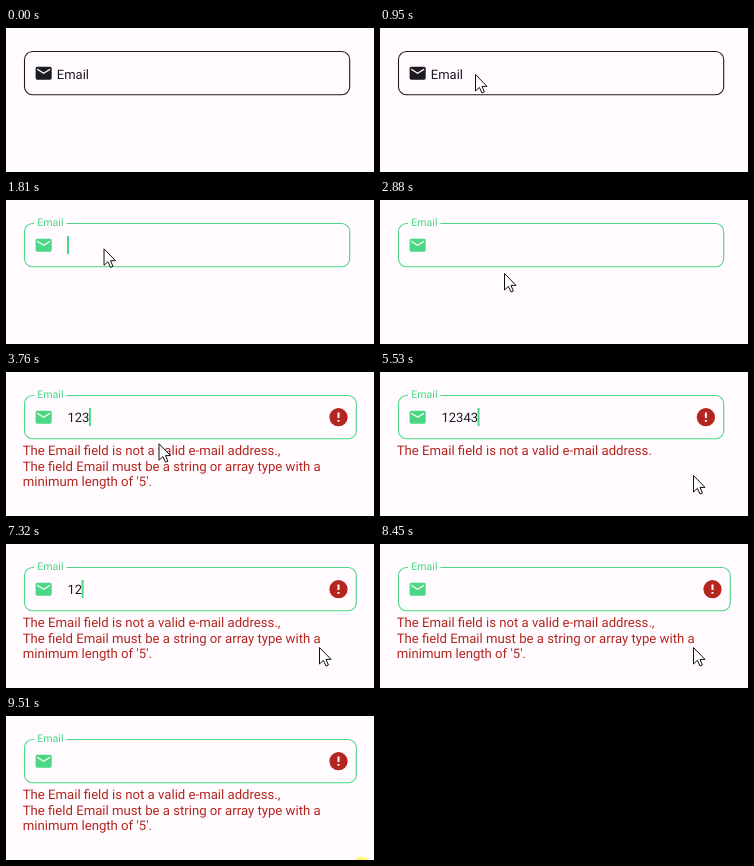
Animation of 368 by 144 pixels, one loop 9.65 s. Source, as an HTML page:

```html
<!DOCTYPE html>
<html lang="en">
<head>
<meta charset="utf-8">
<style>
  html, body { margin: 0; width: 100%; height: 100%; overflow: hidden; background: #fffbff; }
  svg { display: block; width: 368px; height: 144px; font-family: Roboto, sans-serif; text-rendering: geometricPrecision; }
</style>
</head>
<body>
<svg viewBox="0 0 368 144">
  <path id="outline" fill="none"/>
  <path id="mail" transform="translate(28 35.6) scale(.805)"
    d="M20 4H4c-1.1 0-2 .9-2 2v12c0 1.1.9 2 2 2h16c1.1 0 2-.9 2-2V6c0-1.1-.9-2-2-2zm0 4l-8 5-8-5V6l8 5 8-5z"/>
  <text id="label">Email</text>
  <text id="value" x="61.5" y="50" font-size="13" fill="#1c1b1f"></text>
  <rect id="caret" y="36" width="2" height="18" fill="#4bd783"/>
  <g id="badge">
    <circle r="9.1" fill="#b3261e"/>
    <path d="M-1-4.8H1V.9H-1ZM-1 2.7H1V4.6H-1Z" fill="#fffbff"/>
  </g>
  <g id="errors" font-size="13.17" fill="#b3261e">
    <text id="first" x="16.7" y="83"></text>
    <g id="rest">
      <text x="16.7" y="98.7">The field Email must be a string or array type with a</text>
      <text x="16.7" y="114.4">minimum length of '5'.</text>
    </g>
  </g>
  <circle id="press" r="9" fill="#fff25a" fill-opacity=".85"/>
  <path id="pointer" d="M.5.5V17L4.4 13.4L7 19L9.4 18L7 12.4H12Z" fill="#fff" stroke="#111" stroke-linejoin="round"/>
</svg>
<script>
const LOOP = 9650;
const GREEN = '#4bd783', INK = '#1c1b1f';
const FOCUS = 1280;
const BLINK = 500;
const DIGIT = 7.3;
const $ = id => document.getElementById(id);

// [time, field text]
const edits = [
  [1375, ''], [3145, '1'], [3415, '12'], [3615, '123'], [4095, '1234'], [4525, '12343'],
  [6260, '1234'], [7045, '123'], [7245, '12'], [7645, '1'], [7920, '']
];

// [start, end, from, control, to]
const moves = [
  [70, 945, [300, 146], [262, 66], [95, 46]],
  [1745, 2090, [95, 46], [108, 58], [124, 73]],
  [3620, 3860, [124, 73], [146, 70], [170, 72]],
  [4050, 4860, [170, 72], [240, 74], [306, 97]],
  [5120, 5330, [306, 97], [310, 100], [313, 103]],
  [9060, 9330, [313, 103], [330, 122], [348, 150]]
];

const clamp = x => Math.max(0, Math.min(1, x));
const mix = (a, b, k) => a + (b - a) * k;
const ease = k => k * k * (3 - 2 * k);
const within = (t, a, b) => t >= a && t < b;
const show = (id, on) => $(id).setAttribute('visibility', on ? 'visible' : 'hidden');
const set = (id, attrs) => {
  for (const name in attrs) $(id).setAttribute(name, attrs[name]);
};

function pointerAt(t) {
  const [a, b, p, c, q] = moves.filter(m => m[0] <= t).pop() || moves[0];
  const k = ease(clamp((t - a) / (b - a)));
  return [0, 1].map(i => mix(mix(p[i], c[i], k), mix(c[i], q[i], k), k));
}

function drawField(t, right) {
  const focused = t >= FOCUS;
  const k = ease(clamp((t - FOCUS) / 150));
  const color = focused ? GREEN : INK;
  const notch = focused ? 'M60.5 23.5' : 'M28 23.5';
  set('outline', {
    d: `${notch}H${right - 8}a8 8 0 0 1 8 8V58.8a8 8 0 0 1-8 8H26.5a8 8 0 0 1-8-8V31.5a8 8 0 0 1 8-8H28`,
    stroke: color,
    'stroke-width': 1.1
  });
  set('mail', { fill: color });
  set('label', {
    x: mix(50.8, 31.3, k), y: mix(50.5, 26, k),
    'font-size': mix(13, 10.6, k), fill: color
  });
}

function drawInput(t) {
  const edit = edits.filter(e => e[0] <= t).pop();
  const text = edit ? edit[1] : '';
  $('value').textContent = text;
  set('caret', { x: 61 + DIGIT * text.length });
  show('caret', edit && Math.floor((t - edit[0]) / BLINK) % 2 === 0);
}

function drawErrors(t, short, right) {
  const invalid = t >= 3215;
  show('errors', invalid);
  show('badge', invalid);
  $('rest').style.display = short ? 'none' : '';
  $('first').textContent = 'The Email field is not a valid e-mail address.' + (short ? '' : ',');
  set('badge', { transform: `translate(${right - 17.8} 45.2)` });
}

function drawPointer(t) {
  const [x, y] = pointerAt(t);
  set('pointer', { transform: `translate(${x} ${y})` });
  show('pointer', within(t, 125, 9350));
  const leaving = t >= 9500;
  set('press', { cx: leaving ? 355.5 : x, cy: leaving ? 149.5 : y });
  show('press', leaving || within(t, 1205, 1340));
}

function render(t) {
  const short = within(t, 4595, 6325);
  const right = t >= 3215 && !short ? 350.3 : 343.7;
  drawField(t, right);
  drawInput(t);
  drawErrors(t, short, right);
  drawPointer(t);
}

const start = performance.now();
function tick() {
  render((performance.now() - start) % LOOP);
  requestAnimationFrame(tick);
}
tick();
</script>
</body>
</html>
```
